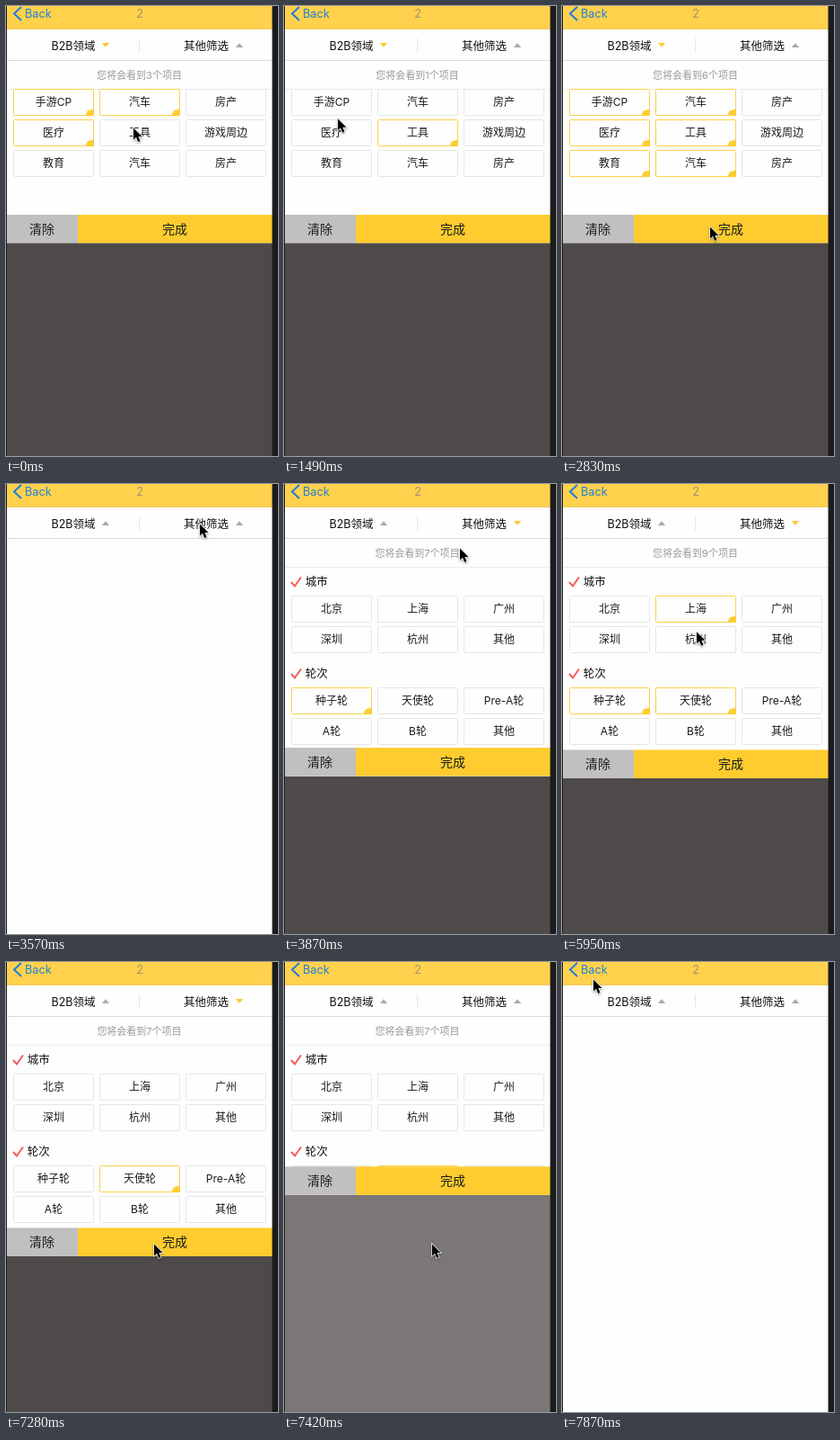
An HTML page for the animation above (8000 ms loop, 303 by 500 pixels).

```html
<!DOCTYPE html>
<html lang="zh-CN">
<head>
<meta charset="utf-8">
<title>Filter menu</title>
<style>
html, body { margin: 0; width: 100%; height: 100%; overflow: hidden; background: #fefefe; }
svg { display: block; width: 303px; height: 500px; }
text { font: 12px Inter, "Noto Sans CJK SC", "Noto Sans CJK", sans-serif; fill: #1c1c1c; text-anchor: middle; }
.tab { font-size: 12.5px; fill: #111; }
.nav { font-size: 12.7px; }
.bar { font-size: 14px; }
.count { font-size: 11px; fill: #999; }
.start { text-anchor: start; }
.chip rect { fill: #fefefe; stroke: #e6e6e6; }
.chip path { display: none; fill: #fdcd35; }
.on rect { stroke: #fcd04c; }
.on path { display: block; }
.tick { fill: none; stroke: #f45a5a; stroke-width: 2; }
</style>
</head>
<body>
<svg id="stage" viewBox="0 0 303 500"></svg>
<script>
const TICK = 148.4, LOOP = 8000, TOP = 61, BAR = 31.6;
const stage = document.getElementById('stage');

// open and close are in ticks
const panels = [
  { bottom: 263.6, open: -9, close: 19.2, arrow: 111 },
  { bottom: 327, open: 24.26, close: 49.2, arrow: 260 }
];

const label = (x, y, s, cls = '') => `<text x="${x}" y="${y}" class="${cls}">${s}</text>`;

const chip = (name, x, y) => `<g class="chip" transform="translate(${x} ${y})">
  <rect x=".5" y=".5" width="89" height="29" rx="1"/>
  <path d="M81 30Q81 24 85.5 23.5Q88.5 23.5 90 21.5V30Z"/>
  ${label(45, 19.3, name)}</g>`;

const chips = (names, top) =>
  names.split(' ').map((n, i) => chip(n, 8 + i % 3 * 96, top + Math.floor(i / 3) * 34)).join('');

const heading = (s, y) =>
  `<path class="tick" d="M8 ${y + 1}l4 4.5 7 -10"/>${label(23.7, y + 4.7, s, 'tab start')}`;

const panel = (id, body) => {
  const { bottom } = panels[id], top = bottom - BAR;
  return `
  <clipPath id="clip${id}"><rect id="mask${id}" x="1" y="${TOP}" width="296" height="0"/></clipPath>
  <g clip-path="url(#clip${id})">
    <rect x="1" y="${TOP}" width="296" height="${bottom - TOP}" fill="#fefefe"/>
    <path d="M1 92.5H297" stroke="#ececec"/>
    <text id="count${id}" class="count" x="148.5" y="81.2"></text>
    ${body}
    <g id="bar${id}">
      <rect x="1" y="${top}" width="79" height="${BAR}" fill="#c0c0c0"/>
      <rect x="80" y="${top}" width="217" height="${BAR}" fill="#fecc2f"/>
      ${label(40, top + 21, '清除', 'bar')}${label(188, top + 21, '完成', 'bar')}
    </g>
  </g>`;
};

stage.innerHTML = `
  <rect width="303" height="500" fill="#fefefe"/>
  <rect id="shade" y="${TOP}" width="303" height="439" fill="#4e4a49"/>
  ${panel(0, chips('手游CP 汽车 房产 医疗 工具 游戏周边 教育 汽车 房产', 92))}
  ${panel(1, heading('城市', 108) + chips('北京 上海 广州 深圳 杭州 其他', 124) +
    heading('轮次', 210) + chips('种子轮 天使轮 Pre-A轮 A轮 B轮 其他', 226))}
  <rect width="303" height="26" fill="#ffd14c"/>
  <path d="M1 25.5H297" stroke="#edc75c"/>
  <path d="M17 1L9 8.5L17 16" fill="none" stroke="#1a7ee0" stroke-width="2"/>
  <text class="nav start" x="21" y="12.8" style="fill:#1f7fd8">Back</text>
  <text class="nav" x="149" y="12.8" style="fill:#a39372">2</text>
  <path d="M1 60.5H297" stroke="#dcdcdc"/>
  <path d="M148.5 36V52" stroke="#e6e6e6"/>
  ${label(75, 49.2, 'B2B领域', 'tab')}${label(223, 49.2, '其他筛选', 'tab')}
  <path id="arrow0"/><path id="arrow1"/>
  <rect width="1" height="500" fill="#1c1c1e"/>
  <rect x="296.5" width="6.5" height="500" fill="#1a1b1d"/>
  <path id="cursor" d="M0 .5V13.5L3 10.8L5.2 16L7.5 15L5.4 10H9.5Z" fill="#000"
    stroke="#fff" stroke-width="1.4" paint-order="stroke" style="filter:drop-shadow(0 1px 1px #0006)"/>`;

const $ = id => document.getElementById(id);
const chipNodes = [...stage.querySelectorAll('.chip')];
const preset = [0, 1, 3, 15];

// Where the pointer rests on a chip
function spot(c) {
  const col = c % 3, row = Math.floor(c / 3);
  return c < 9
    ? [60 + 82 * col, 101 + 34 * row]
    : [78 + 72 * col, 133 + 34 * (row - 3) + (c < 15 ? 0 : 34)];
}

// Pointer stops by tick: a chip number is a tap on it, a pair is a plain place
const tour = [
  [2, 4], [4, 1], [6, 0], [8, 3], [13, 0], [14, 1], [15, 7], [16, 6], [17, 3],
  [19, [165, 245]], [24, [216, 44]],
  [29, spot(10)], [32, 10], [36, 16], [42, 10], [46, 15],
  [49, [165, 313]], [53, [35, 19]]
];
const place = stop => Array.isArray(stop) ? stop : spot(stop);
const clamp = u => Math.min(1, Math.max(0, u));

const ease = v => {
  const u = clamp(v);
  return u < .5 ? 4 * u ** 3 : 1 - 4 * (1 - u) ** 3;
};

// Linger after each stop, then arrive a little early at the next
function pointer(k) {
  const i = tour.findIndex(([at]) => at >= k);
  if (i < 1) return place(tour.at(i)[1]);
  const [a, from] = tour[i - 1], [b, to] = tour[i];
  const leave = a + Math.min(1, (b - a) * .4), arrive = b - Math.min(.7, (b - a) * .2);
  const u = clamp((k - leave) / (arrive - leave)), end = place(to);
  return place(from).map((p, n) => p + (end[n] - p) * u);
}

function draw(k) {
  const on = new Set(preset);
  for (const [at, c] of tour) {
    if (at <= k && !Array.isArray(c)) on.has(c) ? on.delete(c) : on.add(c);
  }
  chipNodes.forEach((n, i) => n.classList.toggle('on', on.has(i)));

  let shade = 0;
  panels.forEach((p, i) => {
    const shown = ease((k - p.open) / 2) - ease((k - p.close) / 2);
    const active = k > p.open && k < p.close, height = p.bottom - TOP;
    const total = [...on].filter(c => i || c < 9).length;
    shade = Math.max(shade, shown);
    $('mask' + i).setAttribute('height', height * shown);
    $('bar' + i).setAttribute('transform', `translate(0 ${height * (shown - 1)})`);
    $('count' + i).textContent = `您将会看到${total}个项目`;
    $('arrow' + i).setAttribute('d', `M${p.arrow - 4.2} ${active ? 41 : 46}h8.4l-4.2 ${active ? 4.8 : -4.8}z`);
    $('arrow' + i).setAttribute('fill', active ? '#fdc92f' : '#a9a9a9');
  });
  $('shade').setAttribute('opacity', shade);
  $('cursor').setAttribute('transform', `translate(${pointer(k)})`);
}

// The screen updates in even ticks, so each pose is held for one of them
let last = -1;
const begin = performance.now();
function frame() {
  const k = Math.floor((performance.now() - begin) % LOOP / TICK);
  if (k !== last) draw(last = k);
  requestAnimationFrame(frame);
}
frame();
</script>
</body>
</html>
```
